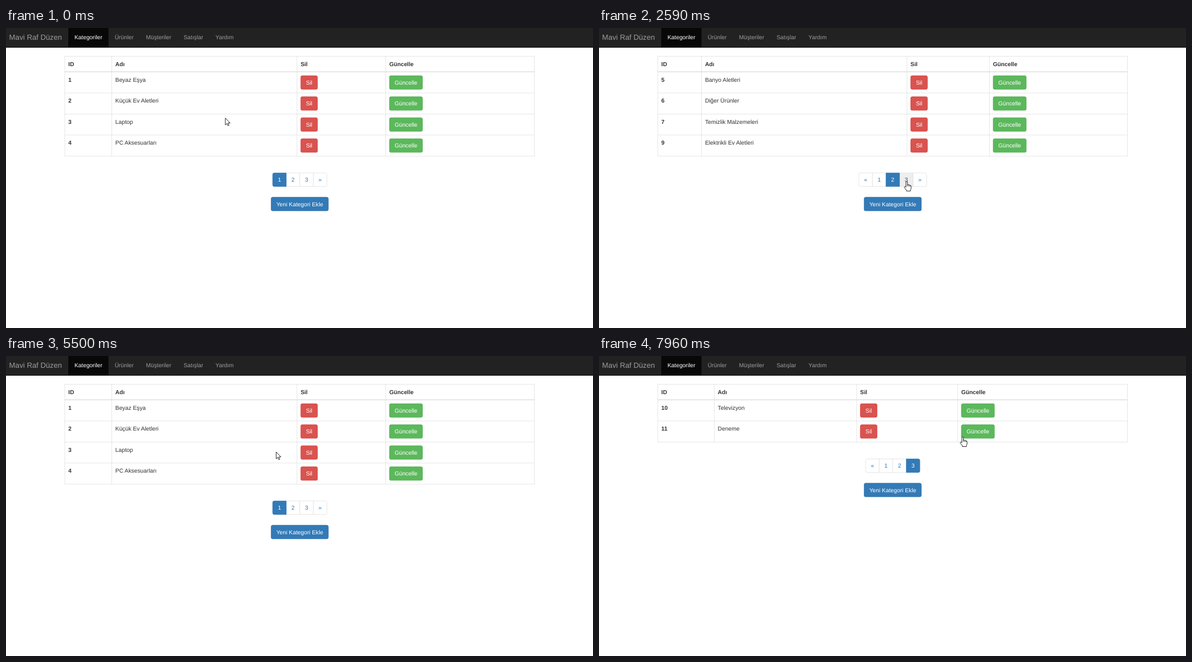
An HTML page with a canvas for the animation above (8 s loop, 1046 by 535 pixels).

```html
<!DOCTYPE html>
<html lang="tr">
<head>
<meta charset="utf-8">
<title>Kategoriler</title>
<style>
html, body { margin: 0; width: 100%; height: 100%; overflow: hidden; background: #fff; }
canvas { display: block; }
</style>
</head>
<body>
<canvas id="stage" width="1046" height="535"></canvas>
<script>
const ctx = document.getElementById('stage').getContext('2d');
const LOOP = 8000;
const STEP = 66;              // time between pointer positions
const PRESS = 195;            // how long a click is held
const U = 0.7346;             // one layout pixel on the stage
const SIZE = 14 * U;
const ROW = 51 * U;
const CELL = 24.15;
const BUTTON = 34 * U;
const TABLE = { left: 104.5, right: 942, top: 50.2 };
const BODY = TABLE.top + 39 * U;
const FONT = '"Liberation Sans", Arial, sans-serif';

const COLORS = {
  danger: ['#d9534f', '#d43f3a'],
  dangerHover: ['#c9302c', '#ac2925'],
  dangerDown: ['#ac2925', '#761c19'],
  success: ['#5cb85c', '#4cae4c'],
  primary: ['#337ab7', '#2e6da4'],
  primaryHover: ['#286090', '#204d74']
};

const first = {
  columns: [188.2, 518.3, 676.3], pager: '123»', active: '1', ids: [1, 2, 3, 4],
  names: ['Beyaz Eşya', 'Küçük Ev Aletleri', 'Laptop', 'PC Aksesuarları']
};
const second = {
  columns: [182.3, 548.5, 695.4], pager: '«123»', active: '2', ids: [5, 6, 7, 9],
  names: ['Banyo Aletleri', 'Diğer Ürünler', 'Temizlik Malzemeleri', 'Elektrikli Ev Aletleri']
};
const third = {
  columns: [205, 458.7, 638.8], pager: '«123', active: '3', ids: [10, 11, 12],
  names: ['Televizyon', 'Deneme', 'Test']
};
const afterDelete = { ...third, names: third.names.slice(0, 2) };

const pages = [[0, first], [1260, second], [2660, third], [5440, first], [7160, afterDelete]];
const clicks = [1000, 2390, 5100, 6900];

// Pointer moves: start, end and key points of a smooth path.
const moves = [
  [0, 0, [[390.5, 160]]],
  [200, 730, [[398, 158], [470, 152], [554, 215], [509.5, 267]]],
  [1720, 2130, [[517.5, 267.3], [538, 272], [548.5, 273.3]]],
  [2920, 3320, [[530, 272], [508.5, 252.4], [524, 234], [557, 225]]],
  [3580, 4170, [[555, 219], [520, 191], [482, 170]]],
  [5440, 5440, [[481, 170.5]]],
  [6160, 6630, [[498, 178], [575, 214], [592, 245], [542, 275]]],
  [7690, 7960, [[560, 262], [615, 200], [648.2, 144]]]
];

// Catmull-Rom curve through the key points, u from 0 to 1.
function along(keys, u) {
  const last = keys.length - 1;
  const i = Math.min(Math.floor(u * last), Math.max(last - 1, 0));
  const f = u * last - i;
  const key = n => keys[Math.min(Math.max(n, 0), last)];
  const [a, b, c, d] = [key(i - 1), key(i), key(i + 1), key(i + 2)];
  return [0, 1].map(k => b[k] + f / 2 * (c[k] - a[k] +
    f * (2 * a[k] - 5 * b[k] + 4 * c[k] - d[k] + f * (3 * (b[k] - c[k]) + d[k] - a[k]))));
}

function pointerAt(t) {
  const [start, end, keys] = moves.findLast(([begin]) => t >= begin);
  const count = Math.round((end - start) / STEP);
  if (!count) return keys[0];
  const done = Math.floor((t - start) / (end - start) * count + 0.1);
  return along(keys, Math.min(done / count, 1));
}

function text(str, x, y, color, { bold = false, size = SIZE, align = 'left' } = {}) {
  ctx.font = `${bold ? 'bold ' : ''}${size}px ${FONT}`;
  ctx.textAlign = align;
  ctx.fillStyle = color;
  ctx.fillText(str, x, y);
}

function textWidth(str) {
  ctx.font = `${SIZE}px ${FONT}`;
  return ctx.measureText(str).width;
}

function rect(x, y, w, h, color) {
  ctx.fillStyle = color;
  ctx.fillRect(x, y, w, h);
}

function box(x, y, w, h, radius, fill, border) {
  ctx.beginPath();
  ctx.roundRect(x + U / 2, y + U / 2, w - U, h - U, radius);
  ctx.fillStyle = fill;
  ctx.fill();
  ctx.lineWidth = U;
  ctx.strokeStyle = border;
  ctx.stroke();
}

function layout(page) {
  const bottom = BODY + ROW * page.names.length;
  const items = [];
  const button = (kind, label, x, y) =>
    items.push({ kind, label, x, y, w: textWidth(label) + 26 * U, h: BUTTON });
  page.names.forEach((name, i) => {
    const y = BODY + 8 * U + ROW * i;
    button('danger', 'Sil', page.columns[1] + 9 * U, y);
    button('success', 'Güncelle', page.columns[2] + 9 * U, y);
  });
  const labels = [...page.pager];
  const left = 523.1 - labels.length * CELL / 2;
  labels.forEach((label, i) => items.push({
    kind: label === page.active ? 'current' : 'link', label,
    x: left + i * CELL, y: bottom + 40 * U, w: CELL, h: BUTTON,
    first: i === 0, last: i === labels.length - 1
  }));
  const add = 'Yeni Kategori Ekle';
  button('primary', add, 523.4 - textWidth(add) / 2 - 13 * U, bottom + 99 * U);
  return { bottom, items };
}

function drawNav() {
  rect(0, 0, 1046, 35.1, '#080808');
  rect(0, 0, 1046, 34.3, '#222');
  text('Mavi Raf Düzen', 5.6, 20.6, '#9d9d9d', { size: 18 * U });
  const pad = 15 * U;
  let x = 111;
  ['Kategoriler', 'Ürünler', 'Müşteriler', 'Satışlar', 'Yardım'].forEach((label, i) => {
    const width = textWidth(label) + 2 * pad;
    if (i === 0) rect(x, 0, width, 34.3, '#080808');
    text(label, x + pad, 19.7, i ? '#9d9d9d' : '#fff');
    x += width;
  });
}

function drawTable(page, bottom) {
  const { left, right, top } = TABLE;
  const line = '#ddd';
  const across = (y, h = U) => rect(left, y, right - left, h, line);
  across(top);
  across(BODY - 2 * U, 2 * U);
  page.names.forEach((name, i) => across(BODY + ROW * (i + 1) - U));
  [left, ...page.columns, right - U].forEach(x => rect(x, top, U, bottom - top, line));

  const lefts = [left, ...page.columns].map(x => x + 9 * U);
  ['ID', 'Adı', 'Sil', 'Güncelle'].forEach((label, i) =>
    text(label, lefts[i], top + 24 * U, '#333', { bold: true }));
  page.names.forEach((name, i) => {
    const y = BODY + 23 * U + ROW * i;
    text(page.ids[i], lefts[0], y, '#333', { bold: true });
    text(name, lefts[1], y, '#333');
  });
}

function drawItem(item, hovered, down) {
  const { kind, label, x, y, w, h } = item;
  let color = '#fff';
  let middle = x + w / 2;
  if (kind === 'link' || kind === 'current') {
    const current = kind === 'current';
    const start = item.first ? 3 : 0, end = item.last ? 3 : 0;
    const fill = current ? '#337ab7' : hovered ? '#eee' : '#fff';
    box(x, y, w + U, h, [start, end, end, start], fill, current ? '#337ab7' : '#ddd');
    if (!current) color = hovered ? '#23527c' : '#337ab7';
    middle += U / 2;
  } else {
    const hover = hovered ? COLORS[kind + 'Hover'] : null;
    const press = hovered && down ? COLORS[kind + 'Down'] : null;
    box(x, y, w, h, 2.6, ...(press || hover || COLORS[kind]));
  }
  text(label, middle, y + 22 * U, color, { align: 'center' });
}

const arrow = new Path2D('M.4 .6V12.9L3.2 10.2 5 14.3 6.9 13.5 5.1 9.5H8.9Z');
const hand = new Path2D('M-1.5 10.6V1.6Q-1.5.4-.2.4 1.2.4 1.2 1.6V6Q3.2 5.2 3.6 6.6 5.4 6 5.8 7.4 7.7 7 7.7 9V12Q7.6 14 6.6 15.3V17.5H-.6V16L-4.3 11.4Q-4.8 9.7-3.2 9.4-2.4 9.4-1.5 10.6Z');
const knuckles = new Path2D('M1.2 6V9M3.6 6.8V9.2M5.8 7.6V9.4');

function drawPointer([x, y], isHand) {
  const shape = isHand ? hand : arrow;
  ctx.save();
  ctx.translate(x, y);
  ctx.fillStyle = '#fff';
  ctx.strokeStyle = '#000';
  ctx.lineWidth = 0.85;
  ctx.fill(shape);
  ctx.stroke(shape);
  if (isHand) ctx.stroke(knuckles);
  ctx.restore();
}

function draw(t) {
  const page = pages.findLast(([start]) => t >= start)[1];
  const [px, py] = pointerAt(t);
  const down = clicks.some(start => t >= start && t < start + PRESS);
  const { bottom, items } = layout(page);
  const target = items.find(({ kind, x, y, w, h }) =>
    kind !== 'current' && px >= x && px < x + w && py >= y && py < y + h);

  rect(0, 0, 1046, 535, '#fff');
  drawNav();
  drawTable(page, bottom);
  // The current page cell lies above its neighbours.
  const isCurrent = item => item.kind === 'current';
  [...items.filter(item => !isCurrent(item)), ...items.filter(isCurrent)]
    .forEach(item => drawItem(item, item === target, down));

  if (down) {
    ctx.beginPath();
    ctx.arc(px, py, 11, 0, Math.PI * 2);
    ctx.fillStyle = 'rgba(255, 255, 0, 0.47)';
    ctx.fill();
  }
  drawPointer([px, py], Boolean(target));
}

function tick() {
  draw(performance.now() % LOOP);
  requestAnimationFrame(tick);
}

ctx.textRendering = 'geometricPrecision';
tick();
</script>
</body>
</html>
```
